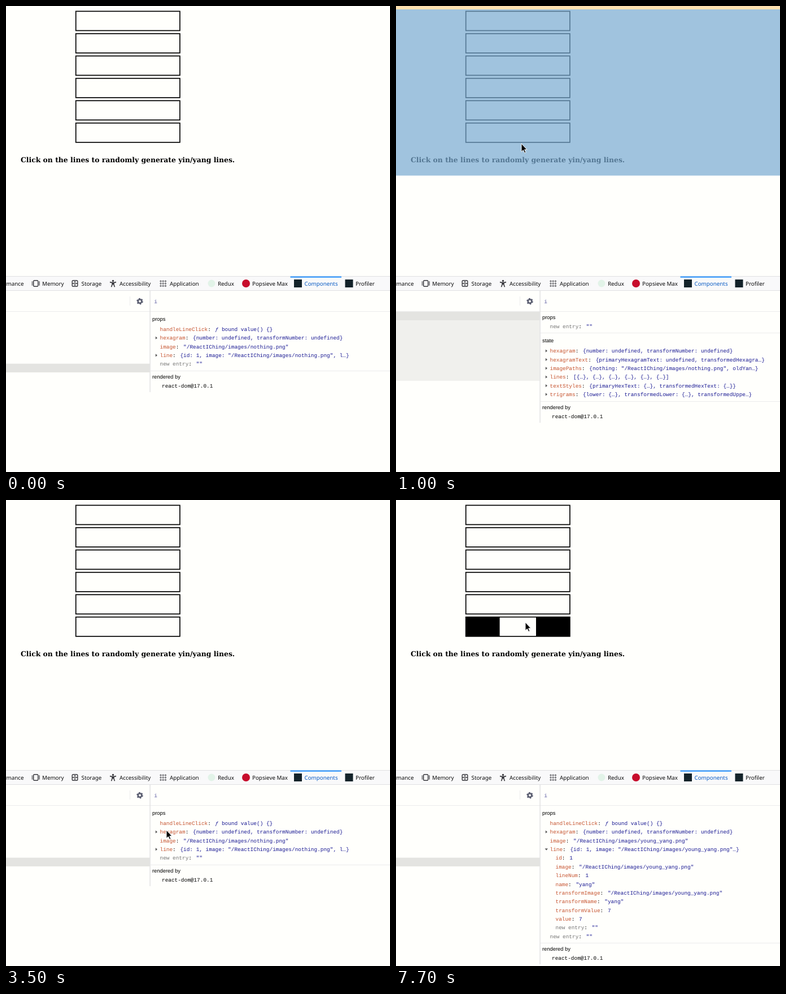
Write an HTML page that moves like this. It is 680 px wide and 823 px high and loops after 8000 ms.

```html
<!DOCTYPE html>
<html lang="en">
<head>
<meta charset="utf-8">
<title>Yin and yang lines with component inspector</title>
<style>
html, body { margin: 0; width: 100%; height: 100%; overflow: hidden; background: #fffffc; }
svg { display: block; width: 680px; height: 823px; }
text { text-rendering: geometricPrecision; }
.heading { font: bold 12.37px "DejaVu Serif", serif; }
.tab { font: 9.8px "Noto Sans", sans-serif; fill: #0c0c0d; }
.active { fill: #0a5cc4; }
.label { font: 9.36px "Liberation Sans", Arial, sans-serif; }
.code { font: 9.415px "Liberation Mono", monospace; }
.name { fill: #c6532f; }
.new { fill: #777; }
.value { fill: #1a1a94; }
.rule { fill: #ececec; }
.box { fill: none; stroke: #000; stroke-width: 1.7; }
.icon { fill: none; stroke: #38383d; stroke-width: 1.4; }
.solid { fill: #38383d; }
.content { fill: rgba(120, 170, 210, .7); }
.margin { fill: rgba(255, 155, 0, .3); }
.tip { font: bold 9.3px "Liberation Mono", monospace; fill: #d7d7d7; }

.show { opacity: 0; animation: 8s step-end infinite; }
#closed { animation-name: closed; }
#root { animation-name: root; }
#open { animation-name: open; }
#filled { animation-name: filled; }
#page { animation-name: page; }
#app { animation-name: app; }
#line { animation-name: line; }
#yang { animation-name: yang; }
#yin { animation-name: yin; }
#cursor { animation: move 8s step-end infinite; }

@keyframes closed { 0%, 15% { opacity: 1 } 8.75%, 56.25%, 100% { opacity: 0 } }
@keyframes root { 0%, 15%, 100% { opacity: 0 } 8.75% { opacity: 1 } }
@keyframes open { 0%, 80%, 100% { opacity: 0 } 56.25% { opacity: 1 } }
@keyframes filled { 0% { opacity: 0 } 80%, 100% { opacity: 1 } }
@keyframes page { 0%, 7.5%, 100% { opacity: 0 } 6.25% { opacity: 1 } }
@keyframes app { 0%, 13.75%, 100% { opacity: 0 } 7.5% { opacity: 1 } }
@keyframes line { 0%, 30%, 100% { opacity: 0 } 13.75% { opacity: 1 } }
@keyframes yang { 0% { opacity: 0 } 75%, 100% { opacity: 1 } }
@keyframes yin { 0% { opacity: 0 } 96.25%, 100% { opacity: 1 } }
@keyframes move {
  0% { transform: translate(-40px, 300px) }
  12.5% { transform: translate(222px, 243px) }
  13.75% { transform: translate(224px, 236px) }
  15% { transform: translate(225px, 231px) }
  35% { transform: translate(238px, 300px) }
  36.25% { transform: translate(265px, 480px) }
  37.5% { transform: translate(290px, 661px) }
  38.75% { transform: translate(283px, 649px) }
  41.25% { transform: translate(278px, 604px) }
  43.75% { transform: translate(284px, 583px) }
  45% { transform: translate(283px, 590px) }
  46.25% { transform: translate(276px, 605px) }
  47.5% { transform: translate(274px, 615px) }
  50% { transform: translate(272px, 616px) }
  51.25% { transform: translate(270px, 616px) }
  52.5% { transform: translate(268px, 615px) }
  63.75% { transform: translate(250px, 360px) }
  66.25% { transform: translate(236px, 290px) }
  67.5% { transform: translate(226px, 236px) }
  68.75% { transform: translate(224px, 222px) }
  70%, 100% { transform: translate(229px, 216px) }
}
</style>
</head>
<body>
<svg viewBox="0 0 680 823">
  <rect width="680" height="823" fill="#fffffc"/>
  <g id="boxes"></g>
  <rect id="yang" class="show" x="123.7" y="206.7" width="184.2" height="34.1"/>
  <rect id="yin" class="show" x="183.6" y="207.5" width="64.4" height="32.5" fill="#fffffc"/>
  <text class="heading" x="26" y="276">Click on the lines to randomly generate yin/yang lines.</text>

  <rect id="page" class="show content" width="680" height="318.5"/>
  <g id="app" class="show">
    <rect class="margin" width="680" height="6"/>
    <rect class="content" y="6" width="680" height="293.5"/>
  </g>
  <g id="line" class="show">
    <rect class="content" x="118" y="203" width="194" height="43"/>
    <rect x="122" y="250" width="104" height="16" rx="2" fill="#333740"/>
    <text class="tip" x="126" y="261"><tspan fill="#ee78e6">i</tspan></text>
    <path d="M141.5 252v12" stroke="#aaa" stroke-width=".8"/>
    <text class="tip" x="152" y="261">251px × 55px</text>
  </g>

  <rect y="477" width="680" height="26" fill="#e0e0e2"/>
  <rect y="478" width="680" height="24" fill="#f9f9fa"/>
  <rect x="503.5" y="477.7" width="90.5" height="1.8" fill="#0a84ff"/>
  <g id="tabs"></g>
  <g class="icon">
    <rect x="48.7" y="484.7" width="8" height="10.6" rx="1.5"/>
    <path d="M45.5 487.5h2M45.5 490h2M45.5 492.5h2M58 487.5h2M58 490h2M58 492.5h2"/>
    <rect x="117.2" y="484.7" width="9.6" height="10.6" rx="1.8"/>
    <path d="M117 490h10M120.5 487.3h3M120.5 492.7h3"/>
    <path d="M184 487.6l4 1h3l4-1M188.3 488.6v3l-1.8 4.6M190.7 488.6v3l1.8 4.6" stroke-width="1.6"/>
  </g>
  <g class="solid">
    <circle cx="189.5" cy="485.5" r="1.7"/>
    <rect x="187.6" y="488" width="3.8" height="4"/>
  </g>
  <g id="dots" class="icon" stroke-width="1"></g>
  <circle cx="364" cy="490" r="6.5" fill="#e2f3e8"/>
  <circle cx="425" cy="490" r="7" fill="#c70d2c"/>
  <rect x="510" y="483" width="14" height="14" fill="#14232a"/>
  <rect x="600.5" y="483" width="14" height="14" fill="#14232a"/>

  <rect class="rule" y="539" width="680" height="1"/>
  <rect class="rule" x="219" y="513" width="1" height="16"/>
  <g fill="none" stroke="#5a5d70">
    <circle cx="237" cy="521.5" r="3.3" stroke-width="2.6"/>
    <circle cx="237" cy="521.5" r="4.9" stroke-width="1.8" stroke-dasharray="2.6 2.53"/>
  </g>
  <text class="code" x="262.3" y="524.5" fill="#5a5aa0">i</text>
  <g id="panels"></g>

  <path id="cursor" d="M0 0V14.6L3.3 11.5L5.8 16.5L8 15.5L5.7 10.7H10Z" fill="#000" stroke="#fff"/>
</svg>
<script>
const CHAR = 5.65, ROW = 15.36;
const byId = id => document.getElementById(id);
const rect = (x, y, w, h, attrs) => `<rect x="${x}" y="${y}" width="${w}" height="${h}" ${attrs}/>`;
const text = (x, y, kind, str) => `<text x="${x}" y="${y}" class="${kind}">${str}</text>`;
const range = n => [...Array(n).keys()];

byId('boxes').innerHTML = range(6)
  .map(i => rect(123.7, 9.35 + 39.47 * i, 184.2, 34.1, 'class="box"')).join('');

byId('dots').innerHTML = range(9)
  .map(i => rect(273 + i % 3 * 4.2, 485 + Math.floor(i / 3) * 4.2, 2, 2, 'rx=".6" stroke-width="1"')).join('');

byId('tabs').innerHTML = [
  [64, 'Memory'], [133.5, 'Storage'], [201, 'Accessibility'], [290, 'Application'],
  [375, 'Redux'], [436, 'Popsieve Max'], [528.5, 'Components', 'active'], [619, 'Profiler']
].map(([x, name, kind = '']) => text(x, 493.5, 'tab ' + kind, name)).join('')
  + '<text x="31.5" y="493.5" class="tab" text-anchor="end">Performance</text>';

// A leading ">" marks a folded entry, "v" an unfolded one, "-" a nested one.
function entry([mark, name, value], i, top) {
  const y = top + i * ROW, x = mark === '-' ? 282.5 : 272.5;
  const end = x + name.length * CHAR;
  const arrow = mark === '>' ? `M264.8 ${y - 5.8}v5.2l3.2-2.6z`
    : mark === 'v' ? `M263.6 ${y - 4.6}h5.4l-2.7 3.2z` : '';
  return `<path d="${arrow}" fill="#555"/>`
    + text(x, y, 'code ' + (name === 'new entry' ? 'new' : 'name'), name)
    + text(end, y, 'code', ':')
    + text(end + CHAR + 7.7, y, 'code value', value);
}
const entries = (list, top) => list.map((e, i) => entry(e, i, top)).join('');

const renderedBy = y => rect(256, y, 424, 1, 'class="rule"')
  + text(259, y + 14.3, 'label', 'rendered by')
  + text(276, y + 29.8, 'code', 'react-dom@17.0.1')
  + rect(254.5, 503, 1.2, y + 38 - 503, 'fill="#dcdcde"');

const panel = (id, body) => `<g id="${id}" class="show">${body}</g>`;
const blank = ['', 'new entry', '""'];
const hexagram = ['>', 'hexagram', '{number: undefined, transformNumber: undefined}'];
const path = file => `"/ReactIChing/images/${file}.png"`;

function linePanel(id, file, preview, details) {
  const list = [
    ['', 'handleLineClick', '<tspan font-style="italic">ƒ</tspan> bound value() {}'],
    hexagram,
    ['', 'image', path(file)],
    [details.length ? 'v' : '>', 'line', `{id: 1, image: ${path(file)}${preview}}`],
    ...details, blank
  ];
  return panel(id, rect(0, 631.7, 254.5, 15.4, 'fill="#e4e4e1"')
    + text(259, 556, 'label', 'props')
    + entries(list, 574)
    + renderedBy(details.length ? 782 : 644));
}

const details = (file, name, value) => [
  ['id', 1], ['image', path(file)], ['lineNum', 1], ['name', name],
  ['transformImage', path(file)], ['transformName', name],
  ['transformValue', value], ['value', value], ['new entry', '""']
].map(pair => ['-', ...pair]);

const rootPanel = panel('root',
  rect(0, 540, 254.5, 15, 'fill="#e4e4e1"')
  + rect(0, 555, 254.5, 107, 'fill="#f0f0ed"')
  + text(259, 553.3, 'label', 'props')
  + entries([blank], 569)
  + rect(256, 577, 424, 1, 'class="rule"')
  + text(259, 594.3, 'label', 'state')
  + entries([
    hexagram,
    ['>', 'hexagramText', '{primaryHexagramText: undefined, transformedHexagra…}'],
    ['>', 'imagePaths', `{nothing: ${path('nothing')}, oldYan…}`],
    ['>', 'lines', '[{…}, {…}, {…}, {…}, {…}, {…}]'],
    ['>', 'textStyles', '{primaryHexText: {…}, transformedHexText: {…}}'],
    ['>', 'trigrams', '{lower: {…}, transformedLower: {…}, transformedUppe…}']
  ], 612.3)
  + renderedBy(698));

byId('panels').innerHTML = rootPanel
  + linePanel('closed', 'nothing', ', l…', [])
  + linePanel('open', 'nothing', ', l…', details('nothing', 'undefined', 'undefined'))
  + linePanel('filled', 'young_yang', '…', details('young_yang', '"yang"', 7));
</script>
</body>
</html>
```
